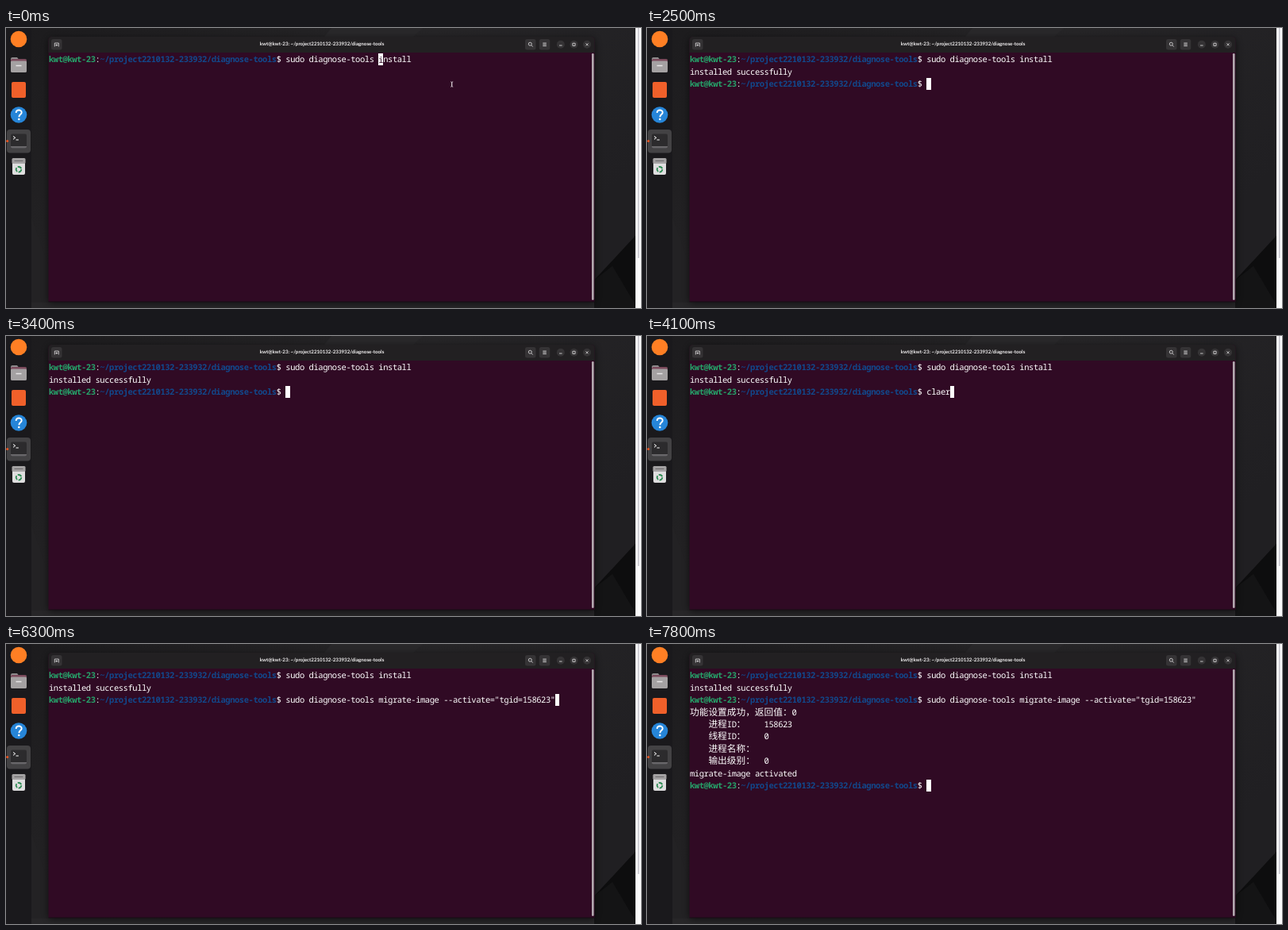
Write an HTML page that moves like this. It is 800 px wide and 353 px high and loops after 8 s.

```html
<!DOCTYPE html>
<html lang="en">
<head>
<meta charset="utf-8">
<title>Terminal session</title>
<style>
  html, body { margin: 0; width: 100%; height: 100%; overflow: hidden; background: #201f21; }
  #stage { position: relative; width: 800px; height: 353px; overflow: hidden; }
  svg { position: absolute; inset: 0; }
  #title {
    position: absolute; left: 54px; width: 688px; top: 11px; text-align: center;
    font: 700 6.2px/20px Lato, sans-serif; color: #f4f2f3; text-rendering: geometricPrecision;
  }
  #term {
    --cell: 5.85px; --row: 15.45px;
    position: absolute; left: 54px; top: 33.2px; color: #fff; white-space: pre;
    font: 10.5px/var(--row) "Noto Sans Mono", monospace;
    letter-spacing: calc(var(--cell) - .6em); text-rendering: geometricPrecision;
  }
  #term div { height: var(--row); }
  #term b { color: #26a269; }
  #term b + b { color: #12488b; }
  #term i {
    font: 11.7px/0 "Noto Sans CJK SC", "Noto Sans CJK", sans-serif; letter-spacing: 0;
  }
  #term #cursor {
    position: absolute; margin-top: -1.5px; width: var(--cell);
    line-height: calc(var(--row) + 3px); background: #fff; color: #300a24;
  }
</style>
</head>
<body>
<div id="stage">
  <svg width="800" height="353" viewBox="0 0 800 353">
    <defs>
      <linearGradient id="wall" x2="1" y2=".5">
        <stop stop-color="#1c1b1d"/><stop offset=".55" stop-color="#262527"/><stop offset="1" stop-color="#201f22"/>
      </linearGradient>
      <filter id="soft" x="-10%" y="-10%" width="120%" height="120%"><feGaussianBlur stdDeviation="4"/></filter>
    </defs>

    <!-- desktop -->
    <path d="M0 0H793V353H0Z" fill="url(#wall)"/>
    <path d="M410 0H525L512 12H400Z" fill="#29282a"/>
    <path d="M32 238L54 300V353H32Z" fill="#232224"/>
    <path d="M32 346H793V353H32Z" fill="#272628"/>
    <path d="M741 318L793 262V353H741Z" fill="#141415"/>
    <path d="M793 262L741 318L764 300L793 349Z" fill="#0d0d0e"/>
    <path d="M0 0H32V353H0Z" fill="#1a191c"/>
    <path d="M793 0H800V353H793Z" fill="#fbfbfc"/>
    <path d="M796.8 0V290" stroke="#c9c8cf" stroke-width="1.6"/>

    <!-- dock -->
    <circle cx="16" cy="14" r="10.3" fill="#ff7f24"/>
    <path d="M6 39q0-2 2-2h6l2 2.500h8q2 0 2 2V54q0 2-2 2H8q-2 0-2-2Z" fill="#8e8a8c"/>
    <path d="M6 41q0-2 2-2h16q2 0 2 2v1H6Z" fill="#7b4a5c"/>
    <path d="M6 43q0-1.500 1.500-1.500h17q1.500 0 1.500 1.500V54q0 2-2 2H8q-2 0-2-2Z" fill="#a4a1a2"/>
    <path d="M12.500 47.500h7" stroke="#e6e4e5" stroke-width="1.500"/>
    <rect x="7" y="68" width="18" height="20" rx="2" fill="#f0602a"/>
    <circle cx="16" cy="109.500" r="10.300" fill="#2685d8"/>
    <path d="M12.700 107c0-4.500 7-4.500 7-.500 0 2.600-3.300 2.600-3.300 5.700" fill="none" stroke="#fff" stroke-width="1.900"/>
    <circle cx="16.300" cy="115" r="1.300" fill="#fff"/>
    <rect x="1" y="128" width="30" height="29.500" rx="4" fill="#434244"/>
    <circle cx="1.700" cy="142.500" r="1.500" fill="#e95420"/>
    <rect x="6" y="133.500" width="20" height="18" rx="2" fill="#2c2b2d"/>
    <path d="M6 149h20v.800q0 1.700-2 1.700H8q-2 0-2-1.700Z" fill="#69676a"/>
    <path d="M9 136.500l2.800 1.900L9 140.300M12.500 141h3.300" fill="none" stroke="#fff" stroke-width="1"/>
    <path d="M8 168h16v15q0 2-2 2H10q-2 0-2-2Z" fill="#dfdedf"/>
    <rect x="7.500" y="164" width="17" height="7" rx="1.500" fill="#a3a1a2"/>
    <path d="M10.500 167.500h11" stroke="#6a686a" stroke-width="1"/>
    <circle cx="16" cy="178.300" r="3.300" fill="none" stroke="#2c8a52" stroke-width="1.800" stroke-dasharray="5.400 1.510"/>

    <!-- window -->
    <rect x="53" y="13" width="689" height="334" rx="5" fill="#000" opacity=".55" filter="url(#soft)"/>
    <path d="M53.500 345V16q0-5 5-5H736.500q5 0 5 5V345Z" fill="#300a24"/>
    <path d="M53.500 31V16q0-5 5-5H736.500q5 0 5 5V31Z" fill="#222022"/>
    <path d="M53.500 345H741.500" stroke="#1b0d17" stroke-width="1"/>
    <rect x="738" y="32" width="2.600" height="311" rx="1.300" fill="#b3a9b0"/>
    <g fill="#353335">
      <rect x="57" y="14" width="13.500" height="13.500" rx="2.500"/>
      <rect x="654" y="14" width="13.500" height="13.500" rx="2.500"/>
      <rect x="671.800" y="14" width="13.500" height="13.500" rx="2.500"/>
      <circle cx="698.800" cy="20.800" r="5"/>
      <circle cx="715.500" cy="20.800" r="5"/>
      <circle cx="732" cy="20.800" r="5"/>
    </g>
    <g fill="none" stroke="#e8e6e7" stroke-width=".8">
      <path d="M61.300 23.500v-4.500h5v4.500M63.800 20.300v2.600M62.500 21.600h2.600"/>
      <circle cx="660.300" cy="20.200" r="2"/>
      <path d="M661.800 21.700l1.900 1.900M676.300 19h4.500M676.300 20.800h4.500M676.300 22.600h4.500"/>
      <path d="M697 22h3.600M713.900 19.200h3.200v3.200h-3.200ZM730.500 19.300l3 3M733.500 19.300l-3 3"/>
    </g>

    <!-- pointer -->
    <path id="pointer" d="M560.200 67.800q1.500 0 1.500 1v4.400q0 1-1.500 1M563.200 67.800q-1.500 0-1.500 1v4.400q0 1 1.500 1" fill="none" stroke="#e9e2e7" stroke-width=".8"/>
  </svg>
  <div id="title">kwt@kwt-23: ~/project2210132-233932/diagnose-tools</div>
  <div id="term"><section id="lines"></section><div id="cursor"></div></div>
</div>
<script>
  const LOOP = 8000, CELL = 5.85, ROW = 15.45, PROMPT_COLS = 51;
  const $ = id => document.getElementById(id);
  const prompt = '<b>kwt@kwt-23</b>:<b>~/project2210132-233932/diagnose-tools</b>$ ';
  const tool = 'sudo diagnose-tools ';
  const install = tool + 'install';
  const report = tool + 'migrate-image --report';
  const activate = tool + 'migrate-image --activate="tgid=158623"';

  const first = [prompt + install];
  const done = [...first, 'installed successfully'];
  const output = [
    ...done, prompt + activate,
    '功能设置成功，返回值：0',
    '    进程ID：    158623',
    '    线程ID：    0',
    '    进程名称：',
    '    输出级别：  0',
    'migrate-image activated',
    prompt
  ];

  // A screen state: start time, lines, cursor row and column, character under it
  const at = (time, lines, row, col, char = '', on = true) => ({ time, lines, row, col, char, on });
  const recall = (time, cmd, on) =>
    at(time, [...done, prompt + cmd], 2, PROMPT_COLS + cmd.length, '', on);
  const edit = (time, on) => at(time, first, 0, PROMPT_COLS + tool.length, 'i', on);
  const result = (time, on) => at(time, output, 9, PROMPT_COLS, '', on);

  const states = [
    edit(0), edit(500, false), edit(1100),
    at(1700, first, 1, 0),
    recall(2100, ''), recall(2600, install), recall(2800, 'claer'),
    recall(3200, install), recall(3400, ''), recall(3900, install),
    recall(4100, 'claer'), recall(4300, report), recall(4900, activate),
    recall(5700, activate, false), recall(6300, activate),
    result(6600), result(7200, false), result(7700)
  ];

  const toRow = s => `<div>${s.replace(/[\u3000-\uffef]+/g, '<i>$&</i>')}</div>`;
  let shown;

  function draw(now) {
    const t = now % LOOP;
    const s = states.findLast(state => state.time <= t);
    if (s !== shown) {
      shown = s;
      $('lines').innerHTML = s.lines.map(toRow).join('');
      $('cursor').textContent = s.char;
      $('cursor').style.cssText =
        `left:${s.col * CELL}px;top:${s.row * ROW}px;visibility:${s.on ? 'visible' : 'hidden'}`;
      $('pointer').style.display = t < 1700 ? '' : 'none';
    }
    requestAnimationFrame(draw);
  }
  draw(performance.now());
</script>
</body>
</html>
```
